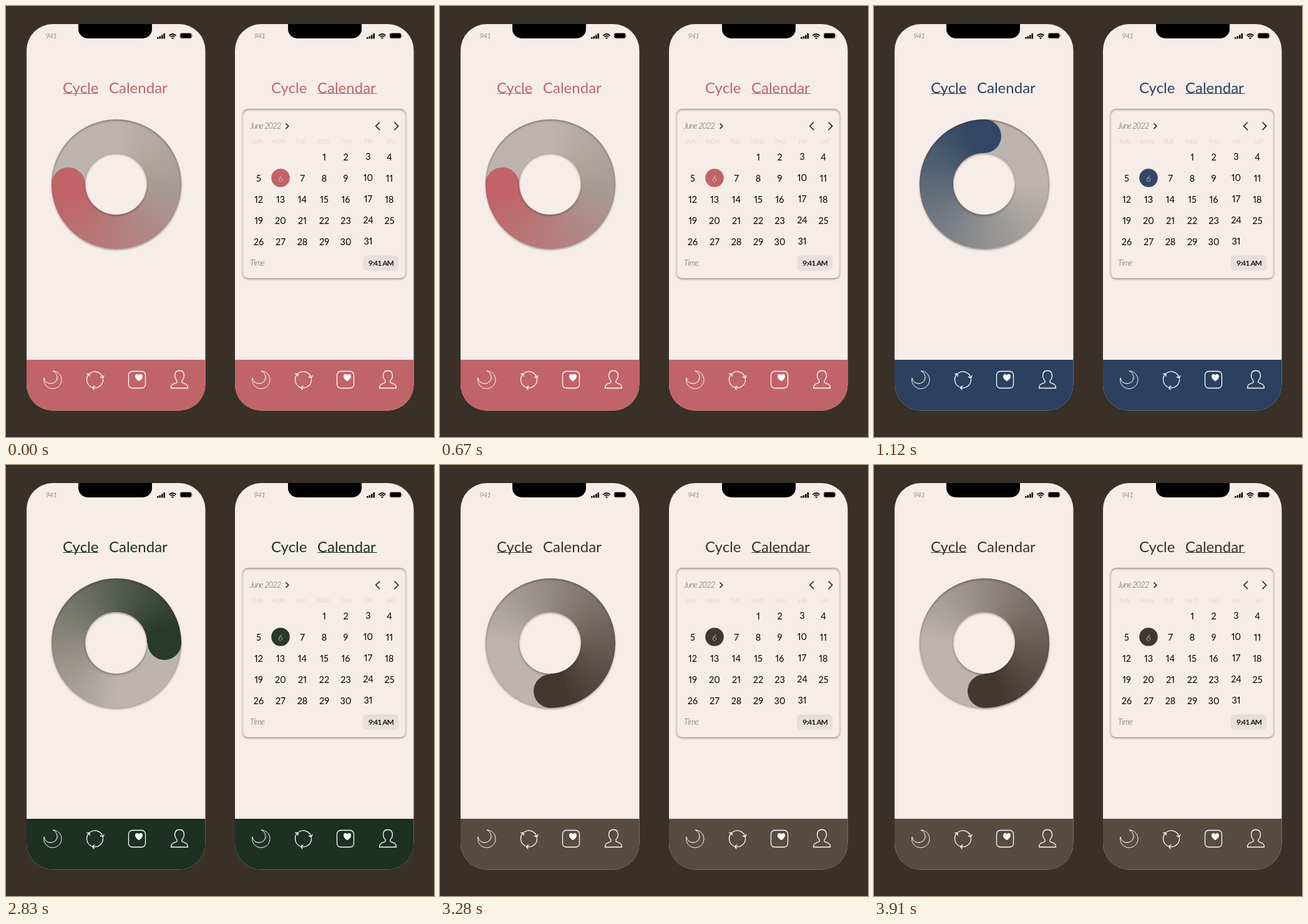
Write an HTML page that moves like this. It is 686 px wide and 692 px high and loops after 4330 ms.

```html
<!DOCTYPE html>
<html lang="en">
<head>
<meta charset="utf-8">
<title>Cycle calendar</title>
<style>
html, body { margin: 0; width: 100%; height: 100%; overflow: hidden; background: #393028; }
svg { position: absolute; left: 0; top: 0; font-family: Lato, "Open Sans", sans-serif; }
.bar { fill: var(--bar); }
.ink { fill: var(--ink); }
.head { font-size: 24px; }
.thin { font-style: italic; font-weight: 300; fill: #5d5653; }
.day { font-size: 14.5px; text-anchor: middle; font-variant-numeric: proportional-nums; }
.week { font-size: 9.5px; text-anchor: middle; font-style: italic; font-weight: 300; fill: #cdc5c2; }
.line { fill: none; stroke: #fff; stroke-width: 1.3; stroke-linejoin: round; }
.arrow { fill: none; stroke: #2d2725; stroke-width: 1.7; }
.soft, .soft::before, .ring i { position: absolute; box-sizing: border-box; }
.soft { box-shadow: 0 2px 3px rgba(60, 40, 40, .42), inset 0 2px 3px rgba(60, 40, 40, .42); }
.panel { left: 379px; top: 165px; width: 262px; height: 272px; border-radius: 9px; }
.disc { left: 72.5px; top: 181.5px; width: 208px; height: 208px; border-radius: 50%; }
.hole { left: 127px; top: 236px; width: 99px; height: 99px; border-radius: 50%; background: #f6ede8; }
.ring {
  position: absolute; left: 72.5px; top: 181.5px; width: 208px; height: 208px; border-radius: 50%;
  background: conic-gradient(#bdb4af 90deg, var(--mid) 180deg, var(--cap) 345deg);
  transform: rotate(var(--turn));
}
.ring i { left: 77px; top: 0; width: 54px; height: 54px; border-radius: 50%; background: var(--cap); }
</style>
</head>
<body>
<svg width="686" height="692">
  <defs>
    <g id="phone">
      <rect x="33" y="29" width="286.5" height="620.5" rx="42" fill="#f6ede8"/>
      <path class="bar" d="M33 568H319.5V607.5a42 42 0 0 1-42 42H75a42 42 0 0 1-42-42z"/>
      <g class="ink head"><text x="91" y="139.5">Cycle</text><text x="165" y="139.5">Calendar</text></g>
      <text class="thin" x="63" y="52" font-size="12.5" letter-spacing="-1.3">941</text>
      <g class="line">
        <path d="M75 586A14.2 14.2 0 1 1 61 597A10.5 10.5 0 1 0 75 586z" stroke-width="1"/>
        <path d="M64 603A12 12 0 0 0 84 594" stroke-width="1" stroke-dasharray="1 2"/>
        <g id="arcs"></g>
        <rect x="196.5" y="586.5" width="27" height="27" rx="6"/>
        <path d="M264.5 613.5h27c0-7-5-7-9.5-9v-3c3-3 4-7 3-11c-1-4-4-5-7-5s-6 1-7 5c-1 4 0 8 3 11v3c-4.5 2-9.5 2-9.5 9z"/>
      </g>
      <path fill="#fff" d="M213 602.5C209 600 207 597.5 207 594.5C207 590.5 211.500 590 213 593C214.500 590 219 590.5 219 594.500C219 597.5 217 600 213 602.5z"/>
    </g>
    <g id="status">
      <path d="M116 29H234V37a15 15 0 0 1-15 15H131a15 15 0 0 1-15-15z"/>
      <path d="M242 50h2.500v2.500h-2.500zM245.500 48.500h2.500v4h-2.500zM249 46.500h2.500v6h-2.500zM252.500 44h2.500v8.500h-2.500z"/>
      <path d="M261.500 47.500Q267 42.500 272.500 47.500M263.500 49.700Q267 46.500 270.500 49.700" fill="none" stroke="#000" stroke-width="1.700"/>
      <path d="M265 51.200Q267 49.600 269 51.200L267 53.200z"/>
      <rect x="279.500" y="44" width="17.500" height="7.500" rx="2"/>
      <rect x="279" y="43.500" width="18.500" height="8.500" rx="2.500" fill="none" stroke="#000" stroke-opacity=".35"/>
      <path d="M298.300 46.300v3q1-.3 1-1.500t-1-1.500z" fill="#777"/>
    </g>
  </defs>
  <use href="#phone"/>
  <use href="#phone" x="334"/>
  <use href="#status"/>
  <use href="#status" x="336"/>
  <path class="ink" d="M91.500 140H148v1H91.500zM499.500 140H594.500v1H499.500z"/>

  <text class="thin" x="391" y="197" font-size="13" letter-spacing="-.95">June 2022</text>
  <text class="thin" x="391" y="417" font-size="13" letter-spacing="-.7">Time</text>
  <path class="arrow" d="M448.500 188.500l4.300 4.300l-4.300 4.300M599 186.500l-6.200 6.300l6.200 6.300M622.500 186.500l6.200 6.300l-6.200 6.300"/>
  <rect x="572" y="400.500" width="57.500" height="24.500" rx="6" fill="#e6dfdc"/>
  <text x="581" y="417" font-size="12" letter-spacing="-.8" stroke="#000" stroke-width=".2">9:41 AM</text>
  <circle cx="440" cy="276" r="14.800" fill="var(--cap)"/>
  <g id="days"></g>
</svg>
<div class="soft panel"></div>
<div class="ring"><i></i></div>
<div class="soft disc"></div>
<div class="soft hole"></div>

<script>
const themes = [
  { end: 1120, bar: '#c06469', ink: '#c06469', cap: '#c06469', mid: '#a79c95', turn: '270deg' },
  { end: 2160, bar: '#2c4060', ink: '#2c4060', cap: '#324764', mid: '#919190', turn: '0deg' },
  { end: 3280, bar: '#1d3024', ink: '#1d3024', cap: '#28392d', mid: '#8d8980', turn: '90deg' },
  { end: 4330, bar: '#574c40', ink: '#3a312b', cap: '#43382f', mid: '#918983', turn: '180deg' }
];

const label = (x, y, cls, s) => `<text x="${x}" y="${y}" class="${cls}">${s}</text>`;
const weekX = [402, 437, 472.5, 508.5, 545, 581, 617];
const dayX = [405, 440, 475, 510, 544.5, 580.5, 614.5];
let days = 'SUN MON TUE WED THU FRI SAT'.split(' ')
  .map((s, i) => label(weekX[i], 221, 'week', s)).join('');
for (let d = 1; d <= 31; d++) {
  const col = (d + 2) % 7, row = Math.floor((d + 2) / 7);
  const y = 248 + row * 34 - (col === 5 ? 0.8 : 0);
  days += d === 6
    ? `<text x="440" y="${y}" class="day" font-style="italic" font-weight="300" fill="#e9dcd8">6</text>`
    : label(dayX[col], y, 'day', d);
}
document.getElementById('days').innerHTML = days;

// Three clockwise arcs, each ending in an arrowhead
document.getElementById('arcs').innerHTML = [-15, 105, 225].map(a =>
  `<path transform="translate(142.5 600) rotate(${a})" d="M-4.450 -12.220A13 13 0 0 1 13 0M9.500 -2.500L13 1L16 -3"/>`
).join('');

const style = document.documentElement.style;
let shown;
function draw(now) {
  const t = now % 4330;
  const theme = themes.find(s => t < s.end);
  if (theme !== shown) {
    shown = theme;
    for (const key of ['bar', 'ink', 'cap', 'mid', 'turn']) style.setProperty('--' + key, theme[key]);
  }
}
const start = performance.now();
function tick() {
  draw(performance.now() - start);
  requestAnimationFrame(tick);
}
tick();
</script>
</body>
</html>
```
